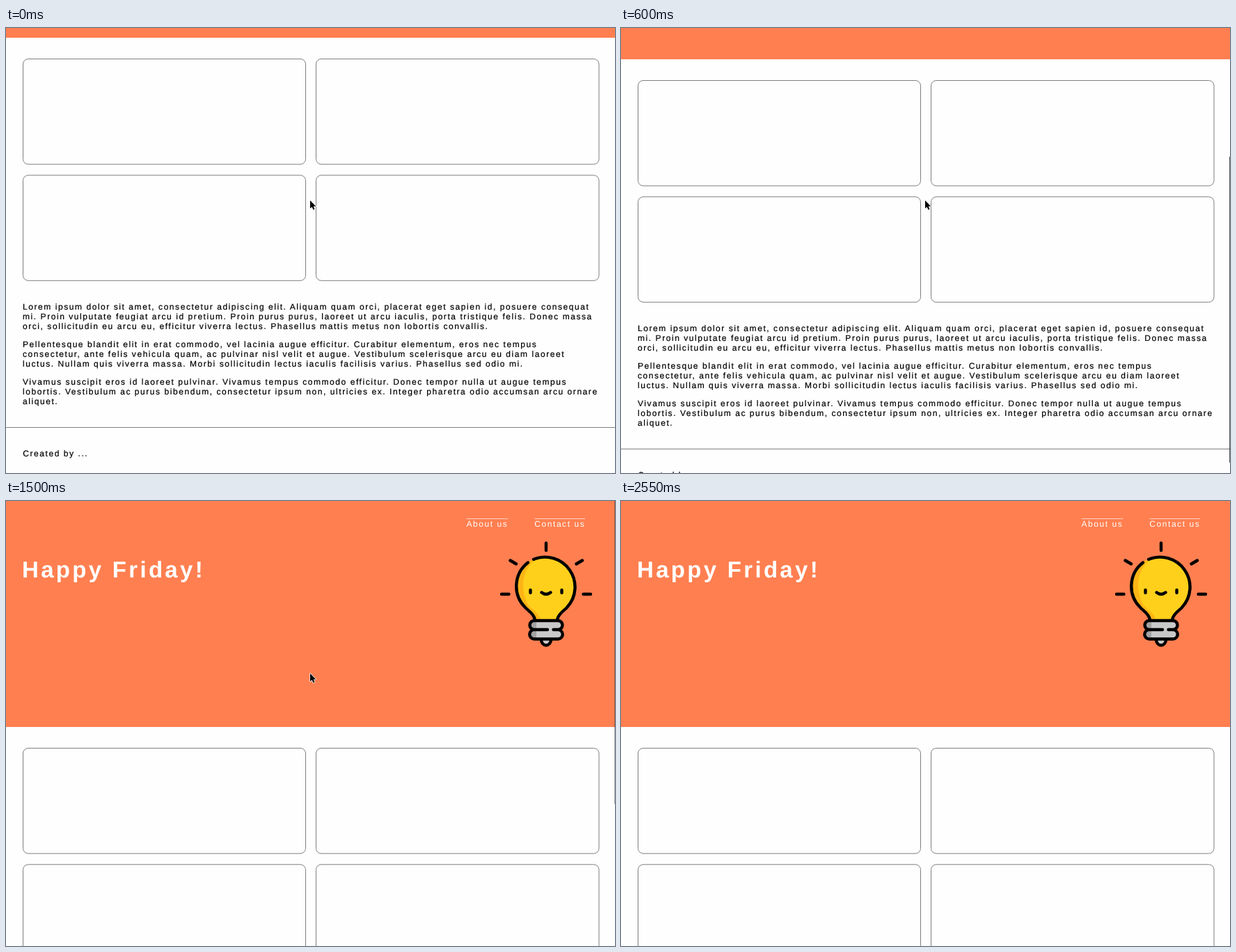
Recreate the animation shown at these times as an HTML page. Size 875 by 640 pixels, loop 3.15 s.

```html
<!DOCTYPE html>
<html lang="en">
<head>
<meta charset="utf-8">
<title>Scrolling page</title>
<style>
  html, body { margin: 0; width: 100%; height: 100%; overflow: hidden; background: #fefefe; }
  svg { display: block; }
  text {
    font: 12px "Liberation Sans", Arial, Helvetica, sans-serif;
    letter-spacing: 1.56px;
    text-rendering: geometricPrecision;
    white-space: pre;
  }
  .copy { stroke: #000; stroke-width: .2; }
  .title { font-size: 33px; font-weight: bold; letter-spacing: 3.3px; }
  .rule { fill: none; stroke: #7f7f7f; }
  .ink { fill: none; stroke: #000; stroke-width: 4.4; stroke-linecap: round; stroke-linejoin: round; }
</style>
</head>
<body>
<svg width="875" height="640">
  <g id="page">
    <rect width="875" height="325" fill="#ff7f50"/>
    <g fill="#fff">
      <text x="661.5" y="36.5">About us</text>
      <text x="759.3" y="36.5">Contact us</text>
      <path d="M661.5 25.5h60M759.5 25.5h72.5" stroke="#fff" opacity=".65"/>
      <text class="title" x="23" y="109.5">Happy Friday!</text>
    </g>

    <g id="bulb">
      <path fill="#fdb515" d="M760 172C759 163 748 156 746 153A43 43 0 1 1 806 153C803 157 792 163 792 172Z"/>
      <path fill="#ffd01b" d="M768 172C767 160 754 156 749 147C738 124 742 97 763 82A43 43 0 0 1 806 153C803 157 792 163 792 172Z"/>
      <path class="ink" d="M750 88.5A43 43 0 0 0 746 153C749 157 759 162 760 171M758 84A43 43 0 0 1 806 153C803 157 793 162 792 171"/>
      <path class="ink" d="M776 60.5v10.5M724.5 85.5l8.5 5M828 85.5l-8.5 5M712 134h10.5M829.5 134h10.5"/>
      <path class="ink" stroke-width="4" d="M753.5 128v4M798.5 128v4M769.5 131.5q6.5 5 13 0"/>
      <path fill="#c9c9c9" d="M768 198v2a7.7 7.7 0 0 0 15.4 0v-2Z"/>
      <rect x="753" y="172" width="46" height="13" rx="6" fill="#c9c9c9"/>
      <rect x="753" y="185" width="46" height="13.5" rx="6" fill="#c9c9c9"/>
      <path fill="#a2a2a2" d="M762 172h-3a6 6 0 0 0 0 13h3ZM762 185h-3a6 6 0 0 0 0 13.5h3Z"/>
      <path fill="#c9c9c9" d="M774 182h18v6h-18Z"/>
      <path class="ink" d="M778 185H759a6.5 6.5 0 0 1 0-13H793a6.5 6.5 0 0 1 0 13H786.5M759 185a6.7 6.7 0 0 0 0 13.5H793a6.7 6.7 0 0 0 0-13.5M769 199.5a7 8 0 0 0 14 0"/>
    </g>

    <g class="rule">
      <rect x="24.5" y="355.5" width="406" height="151.5" rx="7.5"/>
      <rect x="445.5" y="355.5" width="406.5" height="151.5" rx="7.5"/>
      <rect x="24.5" y="522.8" width="406" height="151.5" rx="7.5"/>
      <rect x="445.5" y="522.8" width="406.5" height="151.5" rx="7.5"/>
      <path d="M0 885.5H875"/>
    </g>
    <g id="copy"></g>
    <text class="copy" x="24.3" y="926.5">Created by ...</text>
  </g>
  <rect id="thumb" x="874" width="1" height="440"/>
  <path id="cursor" d="M0 0V11.6L2.6 9.2 4.5 13.4 6.5 12.5 4.7 8.4H8.2Z"
        stroke="#fff" stroke-width="1.4" paint-order="stroke" stroke-linejoin="round"/>
</svg>
<script>
const LOOP = 3150;
const paragraphs = [
  ["Lorem ipsum dolor sit amet, consectetur adipiscing elit. Aliquam quam orci, placerat eget sapien id, posuere consequat",
   "mi. Proin vulputate feugiat arcu id pretium. Proin purus purus, laoreet ut arcu iaculis, porta tristique felis. Donec massa",
   "orci, sollicitudin eu arcu eu, efficitur viverra lectus. Phasellus mattis metus non lobortis convallis."],
  ["Pellentesque blandit elit in erat commodo, vel lacinia augue efficitur. Curabitur elementum, eros nec tempus",
   "consectetur, ante felis vehicula quam, ac pulvinar nisl velit et augue. Vestibulum scelerisque arcu eu diam laoreet",
   "luctus. Nullam quis viverra massa. Morbi sollicitudin lectus iaculis facilisis varius. Phasellus sed odio mi."],
  ["Vivamus suscipit eros id laoreet pulvinar. Vivamus tempus commodo efficitur. Donec tempor nulla ut augue tempus",
   "lobortis. Vestibulum ac purus bibendum, consectetur ipsum non, ultricies ex. Integer pharetra odio accumsan arcu ornare",
   "aliquet."]
];

// Stepped timelines: [start time, value]
const scrollSteps = [[0, 311], [450, 299], [600, 280], [750, 202], [900, 0]];
const thumbSteps = [[0, 0], [450, .65], [1500, .35], [1650, 0]];
const cursorSteps = [[0, [437, 248]], [1950, [472, 270]], [2100, [717, 498.5]], [2400, [763, 547]], [2550, null]];

const byId = id => document.getElementById(id);
const valueAt = (steps, time) => steps.findLast(([start]) => start <= time)[1];

byId("copy").innerHTML = paragraphs.map((lines, p) => lines.map((line, i) =>
  `<text class="copy" x="24" y="${716 + p * 54 + i * 14}">${line}</text>`).join("")).join("");

const page = byId("page"), thumb = byId("thumb"), cursor = byId("cursor");

function draw(now) {
  const time = now % LOOP;
  const scroll = valueAt(scrollSteps, time);
  const pointer = valueAt(cursorSteps, time);
  page.setAttribute("transform", `translate(0 ${-scroll})`);
  thumb.setAttribute("y", -4 + scroll * .675);
  thumb.setAttribute("opacity", valueAt(thumbSteps, time));
  cursor.setAttribute("visibility", pointer ? "visible" : "hidden");
  if (pointer) cursor.setAttribute("transform", `translate(${pointer})`);
}

const startTime = performance.now();
function tick() {
  draw(performance.now() - startTime);
  requestAnimationFrame(tick);
}
tick();
</script>
</body>
</html>
```
